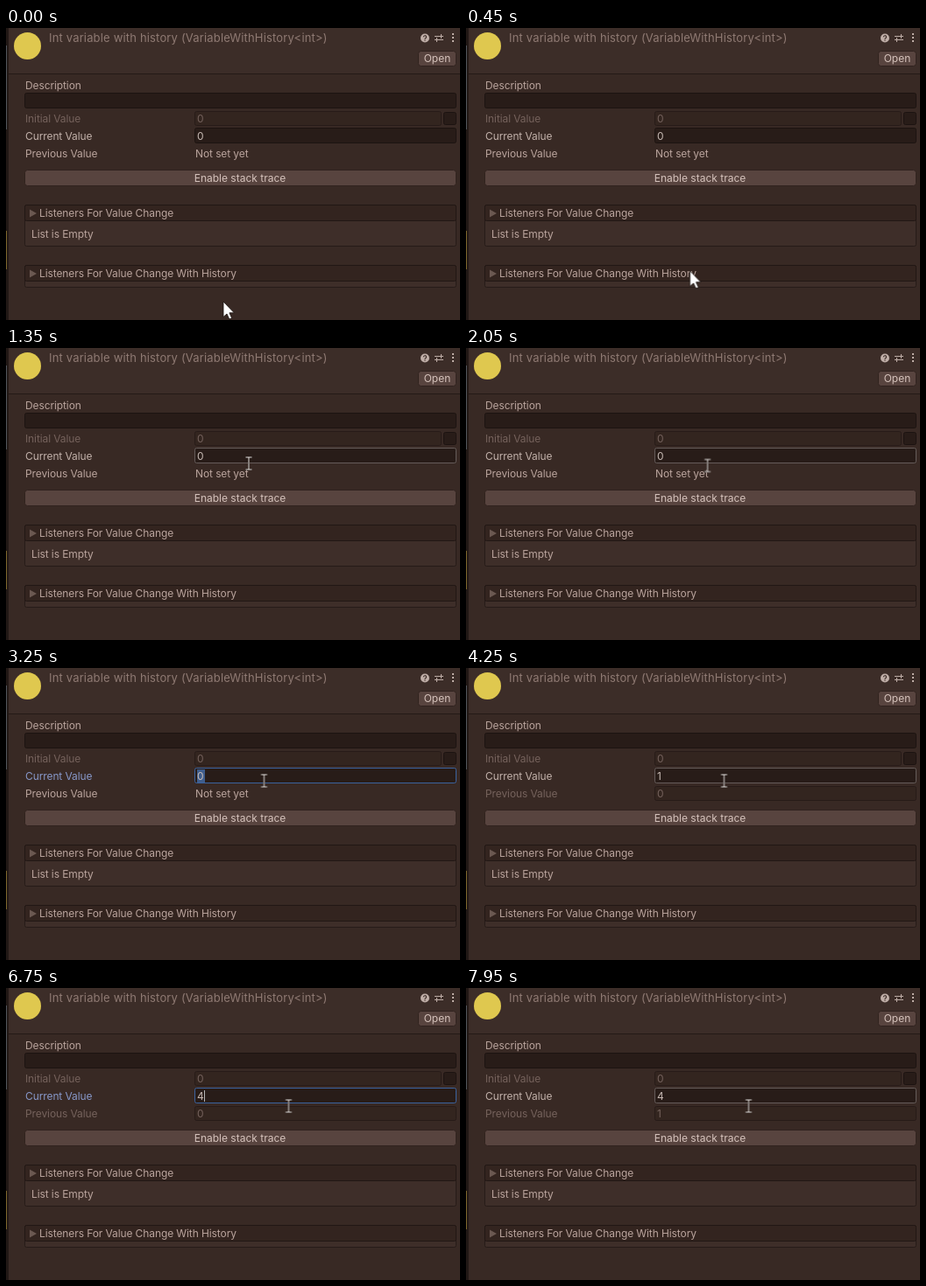
Write an HTML page that moves like this. It is 518 px wide and 334 px high and loops after 8000 ms.

```html
<!DOCTYPE html>
<html lang="en">
<head>
<meta charset="utf-8">
<title>Variable inspector</title>
<style>
  html, body { margin: 0; width: 100%; height: 100%; overflow: hidden; background: #382924; }
  svg { display: block; width: 518px; height: 334px; }
  text { font: 12px Inter, sans-serif; letter-spacing: -.1px; fill: #baa49d; }
  .title { font-size: 13px; fill: #8f7a73; letter-spacing: .17px; }
  .value { fill: #c9bbb5; }
  .dim { fill: #75625c; }
  .mid { text-anchor: middle; letter-spacing: 0; fill: #d6c3bc; }
  .field { fill: #281c18; stroke: #1c1311; }
  .off { fill: #33251f; stroke: #271b18; }
  .button { fill: #58443f; stroke: #30221e; }
  .head { fill: #33241f; stroke: #211714; }
  .body { fill: #3e2e29; stroke: #261b18; }
  .fold { fill: #6b5851; }

  /* hard state changes */
  .s { animation: 8s step-end infinite; }
  #input { animation-name: input; }
  #label { animation-name: label; }
  #mark { animation-name: mark; }
  #caret { animation-name: caret; }
  #v0 { animation-name: v0; }
  #v1 { animation-name: v1; }
  #v4 { animation-name: v4; }
  #unset { animation-name: unset-row; }
  #known { animation-name: known-row; }
  #p0 { animation-name: p0; }
  #p1 { animation-name: p1; }
  #arrow { animation-name: arrow; }
  #beam { animation-name: beam; }
  @keyframes input {
    0% { stroke: #1c1311; }
    16.25%, 53.125%, 87.5% { stroke: #665c5a; }
    36.25%, 68.125% { stroke: #3b639f; }
  }
  @keyframes label {
    0%, 53.125%, 87.5% { fill: #c2b1aa; }
    36.25%, 68.125% { fill: #8798c9; }
  }
  @keyframes mark {
    0%, 48.125%, 81.875% { opacity: 0; }
    36.25%, 68.125% { opacity: 1; }
  }
  @keyframes caret {
    0%, 53.125%, 87.5% { opacity: 0; }
    48.125%, 81.875% { opacity: 1; }
    68.125% { opacity: 0; }
  }
  @keyframes v0 { 0% { opacity: 1; } 48.125%, 100% { opacity: 0; } }
  @keyframes v1 { 0%, 81.875%, 100% { opacity: 0; } 48.125% { opacity: 1; } }
  @keyframes v4 { 0% { opacity: 0; } 81.875%, 100% { opacity: 1; } }
  @keyframes unset-row { 0% { opacity: 1; } 53.125%, 100% { opacity: 0; } }
  @keyframes known-row { 0% { opacity: 0; } 53.125%, 100% { opacity: 1; } }
  @keyframes p0 { 0% { opacity: 1; } 87.5%, 100% { opacity: 0; } }
  @keyframes p1 { 0% { opacity: 0; } 87.5%, 100% { opacity: 1; } }
  @keyframes arrow { 0% { opacity: 1; } 16.25%, 100% { opacity: 0; } }
  @keyframes beam { 0% { opacity: 0; } 16.25%, 100% { opacity: 1; } }

  #pointer { animation: move 8s linear infinite; }
  @keyframes move {
    0%, .6% { transform: translate(248px, 313px); }
    10.625% { transform: translate(263px, 243px); }
    13.125% { transform: translate(276px, 183px); }
    16.25% { transform: translate(277px, 133px); }
    18.75%, 21.875% { transform: translate(277px, 129px); }
    25.625% { transform: translate(275.5px, 134.5px); }
    29.375%, 61.25% { transform: translate(294.5px, 129px); }
    65.625%, 71.25% { transform: translate(300.5px, 130px); }
    76.875%, 100% { transform: translate(322.5px, 135px); }
  }
</style>
</head>
<body>
<svg viewBox="0 0 518 334">
  <rect width="518" height="334" fill="#382924"/>
  <rect width="518" height="52" fill="#3c2d28"/>
  <path d="M2 52.5H518" stroke="#241916"/>
  <rect width="3" height="334" fill="#211815"/>
  <rect y="20" width="1" height="96" fill="#50545a"/>
  <rect y="232" width="1" height="44" fill="#7d662c"/>

  <circle cx="24.5" cy="20.5" r="15.5" fill="#dfc84f"/>
  <text class="title" x="49" y="16">Int variable with history (VariableWithHistory&lt;int&gt;)</text>
  <circle cx="478" cy="11.5" r="5" fill="#bfaea7"/>
  <path d="M476.4 10.3a1.6 1.6 0 1 1 2.2 1.5q-.6.3-.6 1M478 13.6v1.2" fill="none" stroke="#3c2d28" stroke-width="1.2"/>
  <path d="M489 9.5h10M489 13.5h10M496.5 7v5M491.5 11v5" stroke="#bfaea7"/>
  <path d="M509 6h2v2h-2zM509 10h2v2h-2zM509 14h2v2h-2z" fill="#bfaea7"/>
  <rect class="button" x="470.5" y="26.5" width="43" height="17" rx="3"/>
  <text class="mid" x="492" y="39">Open</text>

  <text x="22" y="70">Description</text>
  <rect class="field" x="21.5" y="74.5" width="492" height="17" rx="2"/>
  <text class="dim" x="22" y="108">Initial Value</text>
  <rect class="off" x="215.5" y="95.5" width="281" height="16" rx="2"/>
  <text class="dim" x="218" y="108">0</text>
  <rect class="field" x="499.5" y="96.5" width="14" height="14" rx="2"/>

  <text id="label" class="s" x="22" y="128">Current Value</text>
  <rect id="input" class="field s" x="215.5" y="114.5" width="298" height="17" rx="2"/>
  <rect id="mark" class="s" x="218" y="116" width="9" height="15" fill="#3f5d8c"/>
  <text id="v0" class="value s" x="218" y="128">0</text>
  <text id="v1" class="value s" x="218" y="128">1</text>
  <text id="v4" class="value s" x="218" y="128">4</text>
  <rect id="caret" class="s" x="226" y="117" width="1" height="13" fill="#b4b4b4"/>

  <g id="unset" class="s">
    <text x="22" y="148">Previous Value</text>
    <text x="216" y="148">Not set yet</text>
  </g>
  <g id="known" class="s">
    <text class="dim" x="22" y="148">Previous Value</text>
    <rect class="off" x="215.5" y="135.5" width="298" height="16" rx="2"/>
    <text id="p0" class="dim s" x="218" y="148">0</text>
    <text id="p1" class="dim s" x="218" y="148">1</text>
  </g>

  <rect class="button" x="21.5" y="162.5" width="492" height="18" rx="3"/>
  <text class="mid" x="267" y="176">Enable stack trace</text>

  <rect class="body" x="21.5" y="202.5" width="492" height="47" rx="2"/>
  <rect class="head" x="21.5" y="202.5" width="492" height="18" rx="2"/>
  <path class="fold" d="M27 207.5v9l8-4.5z"/>
  <text x="38" y="216">Listeners For Value Change</text>
  <text x="29" y="240">List is Empty</text>

  <rect class="body" x="21.5" y="271.5" width="492" height="25" rx="2"/>
  <rect class="head" x="21.5" y="271.5" width="492" height="18" rx="2"/>
  <path class="fold" d="M27 276.5v9l8-4.5z"/>
  <text x="38" y="285">Listeners For Value Change With History</text>

  <g id="pointer">
    <path id="arrow" class="s" d="M0 0V17.5L4 14 6.8 20 9.6 18.8 6.9 12.8H12.3z" fill="#fff" stroke="#1a1210" stroke-width=".8"/>
    <g id="beam" class="s" fill="none">
      <path d="M-3.5-7h7M0-7v14M-3.5 7h7" stroke="#1a1210" stroke-width="2"/>
      <path d="M-3.5-7h7M0-7v14M-3.5 7h7" stroke="#eee8e4"/>
    </g>
  </g>
</svg>
</body>
</html>
```
